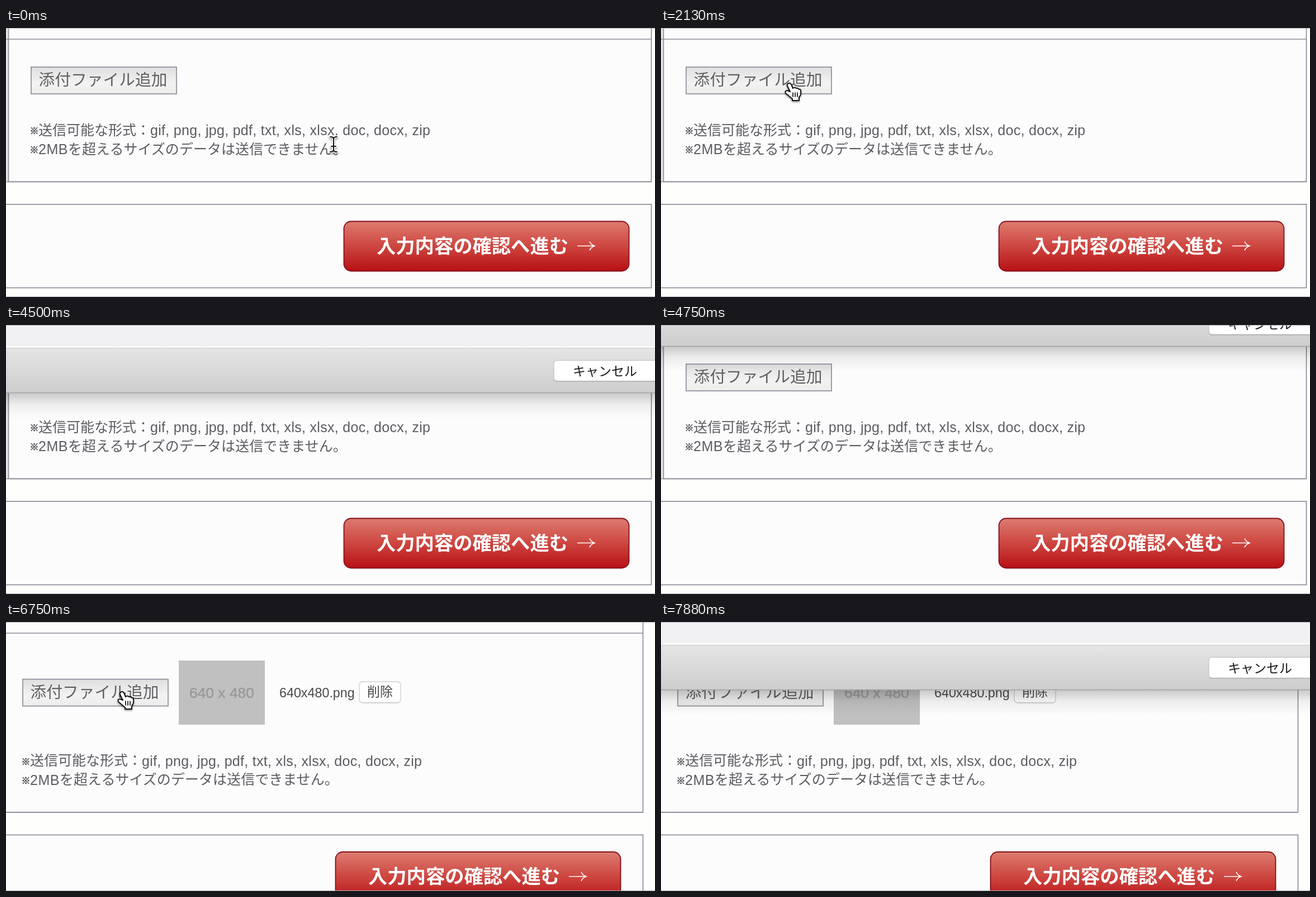
These frames come from a looping animation (1161 px wide and 482 px high, 8000 ms). An HTML page:

```html
<!DOCTYPE html>
<html lang="ja">
<head>
<meta charset="utf-8">
<style>
html, body { margin: 0; width: 100%; height: 100%; overflow: hidden; background: #fefefc; }
svg { display: block; width: 1161px; height: 482px; font-family: "Liberation Sans", "Noto Sans CJK JP", "Noto Sans CJK", sans-serif; }
text { white-space: pre; }
.line { fill: none; stroke: #8d8d9a; stroke-width: 1.7; }
.note { font-size: 25px; font-weight: 300; fill: #5b5b62; }
.mark { font-size: 16px; stroke: #5b5b62; stroke-width: .8px; }
#cursor { filter: drop-shadow(0 2px 1.5px #0006); }
</style>
</head>
<body>
<svg viewBox="0 0 1161 482">
  <defs>
    <linearGradient id="red" x2="0" y2="1">
      <stop stop-color="#dd7b70"/><stop offset=".5" stop-color="#cd4640"/><stop offset="1" stop-color="#b81014"/>
    </linearGradient>
    <linearGradient id="grey" x2="0" y2="1"><stop stop-color="#dfdfe0"/><stop offset=".6" stop-color="#f2f2f2"/><stop offset="1" stop-color="#ededec"/></linearGradient>
    <linearGradient id="bar" x2="0" y2="1"><stop stop-color="#e5e5e5"/><stop offset="1" stop-color="#cdcdce"/></linearGradient>
    <linearGradient id="shade" x2="0" y2="1"><stop stop-opacity=".2"/><stop offset=".45" stop-opacity=".06"/><stop offset="1" stop-opacity="0"/></linearGradient>
  </defs>

  <g id="page">
    <rect x="-20" y="-9" width="25" height="284" fill="#e6e6ea"/>
    <rect id="cell" class="line" x="4.5" y="-9" width="1150" style="fill:#fcfcfc"/>
    <path class="line" d="M-20 20H1154.5"/>

    <g id="upload">
      <rect class="line" x="45" y="70" width="260" height="48" style="fill:url(#grey)"/>
      <text x="58.5" y="103" font-size="28.75" font-weight="300" fill="#606064">添付ファイル追加</text>
    </g>

    <g id="file">
      <rect x="324" y="69" width="154" height="115" fill="#c0c0c0"/>
      <text x="343" y="136" font-size="26.4" fill="#9a9a9c" stroke="#9a9a9c" stroke-width=".6">640 x 480</text>
      <text x="504" y="135" font-size="23.3" fill="#4a4a4e">640x480.png</text>
      <rect x="647" y="107.5" width="74" height="38" rx="6" fill="#bbb"/>
      <rect x="647" y="107" width="74" height="37.5" rx="6" fill="#fff" stroke="#cfcfcf" stroke-width="1.3"/>
      <text x="661" y="132.5" font-size="23" font-weight="300" fill="#444">削除</text>
    </g>

    <g id="lower">
      <path class="line" d="M-20 275.5H1154.5"/>
      <g class="note">
        <text class="mark" x="42.5" y="190">※</text>
        <text x="58" y="191.8">送信可能な形式：</text>
        <text x="258" y="192.3" letter-spacing=".3">gif, png, jpg, pdf, txt, xls, xlsx, doc, docx, zip</text>
        <text class="mark" x="42.5" y="224">※</text>
        <text x="58" y="226.3" letter-spacing=".5">2MB</text>
        <text x="111" y="225.8" letter-spacing=".05">を超えるサイズのデータは送信できません。</text>
      </g>
      <rect class="line" x="-20" y="316" width="1174.5" height="149.5" style="fill:#fcfcfc"/>
      <rect x="604.5" y="346.5" width="510" height="89" rx="13" fill="url(#red)" stroke="#86101a" stroke-width="1.8"/>
      <text x="663" y="402.5" font-size="34.3" font-weight="700" fill="#fff">入力内容の確認へ進む</text>
      <path d="M1022 390.5H1052M1044 382.5Q1046 388 1053 390.5Q1046 393 1044 398.5" fill="none" stroke="#fff" stroke-width="1.6"/>
    </g>
  </g>

  <g id="sheet">
    <rect y="122" width="1161" height="45" fill="url(#shade)"/>
    <rect y="-10" width="1161" height="50" fill="#f1f1f3"/>
    <rect y="38" width="1161" height="3" fill="#fafafa"/>
    <rect y="41" width="1161" height="81" fill="url(#bar)"/>
    <path d="M0 41.5H1161" stroke="#c4c4c6"/>
    <path d="M0 121.5H1161" stroke="#a2a2a6" stroke-width="1.5"/>
    <rect x="980" y="64" width="200" height="37.5" rx="6" fill="#9d9d9d"/>
    <rect x="980" y="63.3" width="200" height="37" rx="6" fill="#fff" stroke="#b8b8b8"/>
    <text x="1014" y="90.5" font-size="23" fill="#1a1a1a">キャンセル</text>
  </g>

  <path d="M0 .5H1161M0 481.5H1161" stroke="#b4b4bc"/>

  <g id="cursor" stroke-linejoin="round" stroke-linecap="round">
    <g id="beam" fill="none" stroke="#fff" stroke-width="5">
      <path id="stem" d="M-6 -13Q0 -13 0 -9V10Q0 14 -6 14M6 -13Q0 -13 0 -9M0 10Q0 14 6 14M-4 4H4"/>
      <path d="M-6 -13Q0 -13 0 -9V10Q0 14 -6 14M6 -13Q0 -13 0 -9M0 10Q0 14 6 14M-4 4H4" stroke="#111" stroke-width="2"/>
    </g>
    <path id="arrow" d="M0 0V27L6 21L10 31L15 29L11 20H19Z" fill="#000" stroke="#fff" stroke-width="2"/>
    <g id="hand" fill="#fff" stroke="#111" stroke-width="2">
      <path d="M-3 1Q0 -2 3 2L6 9Q9 6 12 9Q15 8 17 11Q20 10 20 14Q21 21 17 25V31H5V28L-7 18Q-9 13 -4 13L1 15L-4 5Q-5 2 -3 1Z"/>
      <path d="M6 17V24M10 17V24M14 17V24" stroke-width="1.7"/>
    </g>
  </g>
</svg>
<script>
const LOOP = 8000, ADDED = 5130;
const el = id => document.getElementById(id);
const move = (id, x, y) => el(id).setAttribute('transform', `translate(${x} ${y})`);
const show = (id, on) => el(id).style.display = on ? '' : 'none';
const ease = (t, from, to) => {
  const p = Math.min(1, Math.max(0, (t - from) / (to - from)));
  return p * p * (3 - 2 * p);
};
const inside = (x, y, left, top, right, bottom) => x >= left && x <= right && y >= top && y <= bottom;

// Pointer stops: time, x, y
const stops = [
  [0, 586, 208], [250, 586, 208], [1250, 230, 99], [3130, 230, 99], [3450, 290, -45],
  [5250, 330, -45], [5650, 262, 160], [6000, 250, 158], [6450, 208, 125],
  [7180, 208, 125], [7600, 280, -45], [LOOP, 280, -45]
];

function pointerAt(t) {
  const i = stops.findIndex(s => s[0] > t);
  const [t0, x0, y0] = stops[i - 1], [t1, x1, y1] = stops[i];
  const p = ease(t, t0, t1);
  return [x0 + (x1 - x0) * p, y0 + (y1 - y0) * p];
}

function draw(now) {
  const t = now % LOOP, added = t >= ADDED;
  const dx = added ? -15 : 0, dy = added ? 65.5 : 0, lift = added ? 32.5 : 0;
  move('page', dx, 0);
  move('upload', 0, lift);
  move('lower', 0, dy);
  el('cell').setAttribute('height', 284.5 + dy);
  show('file', added);

  const open = ease(t, 3130, 3400) - ease(t, 4550, 4870) + ease(t, 7180, 7450);
  const edge = 121 * open;
  move('sheet', 0, edge - 121);
  show('sheet', open > 0);

  const [x, y] = pointerAt(t);
  const clear = y > edge;
  const hand = clear && inside(x - dx, y - lift, 44, 69, 305, 118);
  const beam = clear && inside(x - dx, y - dy, 43, 168, 760, 234);
  move('cursor', x, y);
  show('hand', hand);
  show('beam', beam);
  show('arrow', !hand && !beam);
  requestAnimationFrame(frame);
}

const start = performance.now();
const frame = () => draw(performance.now() - start);
frame();
</script>
</body>
</html>
```
